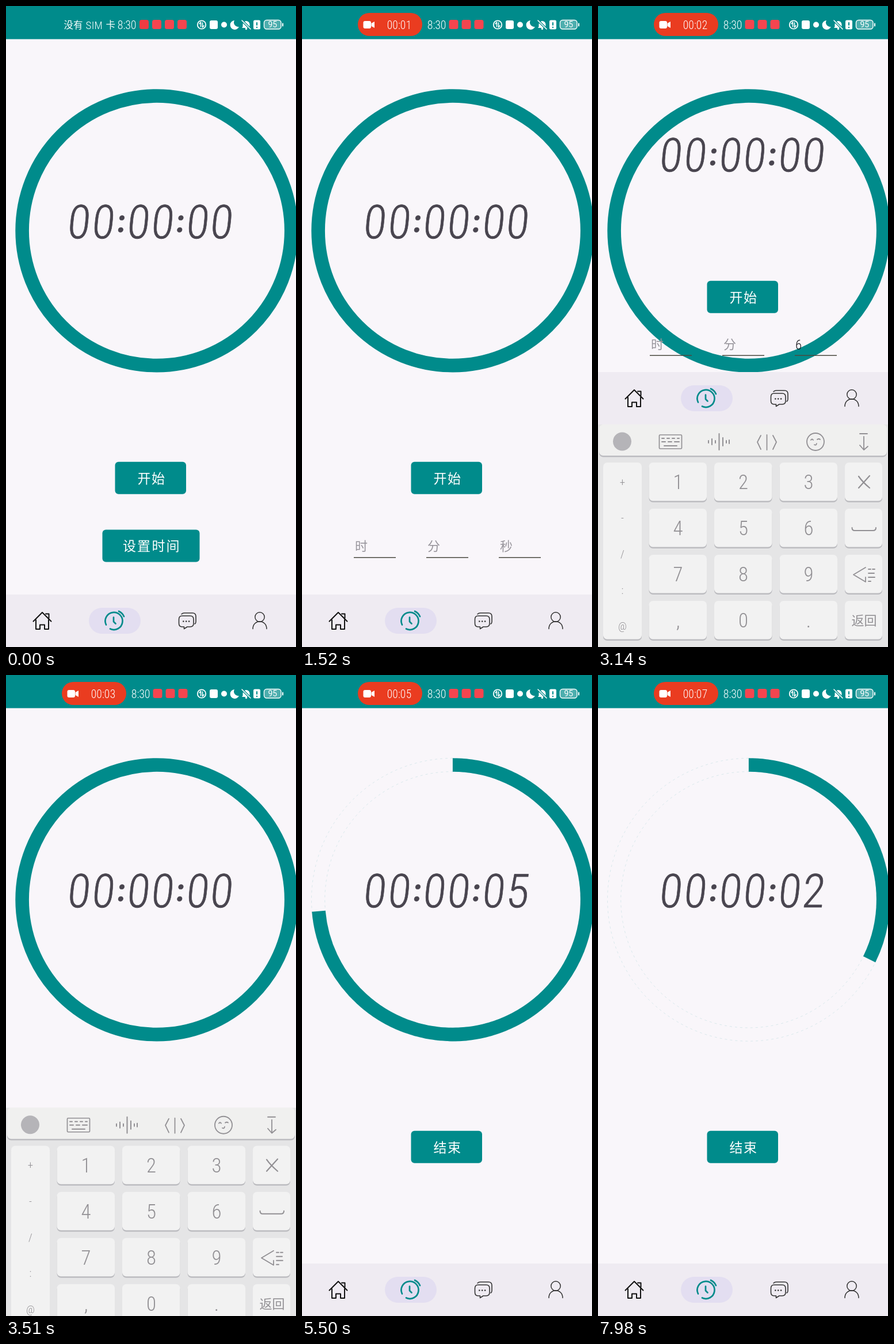
Recreate the animation shown at these times as an HTML page. Size 504 by 1112 pixels, loop 8 s.

```html
<!DOCTYPE html>
<html lang="zh">
<head>
<meta charset="utf-8">
<title>倒计时</title>
<style>
html, body { margin: 0; width: 100%; height: 100%; overflow: hidden; background: #f9f6fa; }
svg { display: block; width: 504px; height: 1112px; }
text { font-family: Roboto, "Noto Sans CJK SC", "Noto Sans CJK", sans-serif; font-weight: 300; }
.thin { font-family: "Roboto Condensed", "Open Sans Condensed", Roboto, sans-serif; font-stretch: 75%; }
.colon { font-size: 52px; font-weight: 700; }
.line { fill: none; stroke-linecap: round; stroke-linejoin: round; }
</style>
</head>
<body>
<svg id="stage" viewBox="0 0 504 1112"></svg>
<script>
const LOOP = 8000, TEAL = '#008b8b', GREY = '#929094', BG = '#f9f6fa', INK = '#49454f';
const CX = 261.9, CY = 389.8;
const T = {
  rec: 210, recEnd: 960, fields: 1400, show: 2112, key: 2950, typed: 3000,
  hide: 3430, press: 3840, run: 3919
};
const KEYBOARD_H = 386, COUNT = 6;

const rect = (x, y, w, h, r, fill, more = '') =>
  `<rect x="${x}" y="${y}" width="${w}" height="${h}" rx="${r}" fill="${fill}" ${more}/>`;
const circle = (x, y, r, fill, more = '') => `<circle cx="${x}" cy="${y}" r="${r}" fill="${fill}" ${more}/>`;
const line = (d, color, w, more = '') =>
  `<path class="line" d="${d}" stroke="${color}" stroke-width="${w}" ${more}/>`;
const text = (x, y, size, str, fill, more = '') =>
  `<text x="${x}" y="${y}" font-size="${size}" fill="${fill}" ${more}>${str}</text>`;
const mid = 'text-anchor="middle"';
const thin = 'class="thin"';
const group = (id, body) => `<g id="${id}">${body}</g>`;

function statusBar() {
  const apps = [232, 254, 276, 298].map((x, i) =>
    rect(x, 24, 16, 16, 3.5, i ? '#f5454f' : '#f03c42', i ? '' : 'id="firstApp"')).join('');
  const moon = '<path d="M397 25a8 8 0 1 0 8 11a7.5 7.5 0 0 1-8-11z" fill="#fff"/>';
  const bell = '<path d="M411.5 36v-4a6 6 0 0 1 12 0v4l1.5 2h-15z" fill="#fff"/>' +
    circle(417.5, 39.5, 1.7, '#fff') +
    line('M410 25L425 40', TEAL, 4) + line('M410 25L425 40', '#fff', 1.6);
  return rect(0, 0, 504, 57.5, 0, TEAL) +
    group('sim', text(100.5, 39, 16.5, '没有', '#fff') +
      text('143.5 151 160.5', 39.5, 19, 'SIM', '#fff', `${thin} ${mid}`) +
      text(173.5, 39, 16.5, '卡', '#fff')) +
    group('clockText', text('198.5 205.5 212 221.5', 39.5, 20, '8:30', '#fff', `${thin} ${mid}`)) +
    group('apps', apps) +
    circle(340, 32.5, 7.2, 'none', 'stroke="#fff" stroke-width="1.8"') +
    line('M336 31L338.5 28V36M341.5 29V37L344 34', '#fff', 1.6) +
    rect(354, 25, 14, 15, 3, '#fff') + circle(379, 32.5, 5, '#fff') +
    moon + bell +
    rect(430, 24.5, 12, 16, 2.5, '#fff') + rect(435, 28, 2, 6, 1, TEAL) + circle(436, 37, 1.2, TEAL) +
    rect(448.5, 24.5, 29.5, 15.5, 4.5, 'rgba(255,255,255,.3)', 'stroke="#fff" stroke-width="1.4"') +
    rect(480, 29.5, 2, 6, 1, '#fff') +
    text(463.3, 37, 14, '95', '#fff', `${mid} style="font-weight:400"`) +
    group('rec', rect(97, 12, 112, 40, 20, '#ea3c20') +
      rect(106.5, 26, 13.5, 13, 3, '#fff') +
      '<path d="M120.5 30L126 27V38L120.5 35z" fill="#fff"/>' +
      text('152.500 162 169 175.500 185.500', 39.5, 19.5, '', '#fff', `id="recText" ${thin} ${mid}`));
}

function navBar() {
  const home = line('M47.5 1067.5L63 1052L78.5 1067.5M52 1065V1081H59V1073.5H67V1081H74V1065M69 1054.5H74.5V1062', '#111', 2);
  const clock = line('M174 1073.500A15 15 0 1 1 181 1080.500M187 1060.500V1068L190.500 1071.500M196 1050Q202 1052.500 205 1059', TEAL, 2.7);
  const chat = line('M306 1058H320Q326 1058 326 1064V1071Q326 1077 320 1077H315L309.5 1080.5V1077H306Q300.5 1077 300.5 1071V1064Q300.5 1058 306 1058', '#333', 1.6) +
    line('M305 1055Q307 1053 310 1053H324Q330 1053 330 1059V1068Q330 1071 328 1072', '#333', 1.6) +
    [308.3, 313.2, 318.1].map(x => circle(x, 1067.5, 1.3, '#333')).join('');
  const person = circle(441, 1060, 8.2, 'none', 'stroke="#333" stroke-width="1.5"') +
    line('M429 1080.5C429 1063.5 453 1063.5 453 1080.5', '#333', 1.5);
  return rect(0, 1021, 504, 91, 0, '#efebf2') +
    rect(144, 1044, 90, 45, 22.5, '#e3def1') + home + clock + chat + person;
}

function keyboard() {
  const cap = (x, y, w, h, more = '') =>
    rect(x, y + 2.5, w, h, 7, '#bcbcc0') + rect(x, y, w, h, 7, '#f2f2f2', more);
  const cols = [88.5, 202, 315.5], rows = [792, 872, 952, 1032];
  const glyphs = ['123', '456', '789', ',0.'];
  let s = rect(0, 726, 504, 386, 0, '#e5e5e6') +
    rect(2, 732, 500, 50.5, 7, '#bcbcc0') + rect(2, 726, 500, 54, 7, '#f0f0ef') + cap(9, 792, 67, 306.5);
  rows.forEach((y, r) => {
    cols.forEach((x, c) => {
      const g = glyphs[r][c];
      s += cap(x, y, 100.5, 66.5, g === '6' ? 'id="six"' : '') +
        text(x + 50.5, y + 46, 35, g, GREY, `${thin} ${mid}`);
    });
    s += cap(429, y, 65, 66.5);
  });
  [...'+-/:@'].forEach((g, i) => { s += text(42.5, 831.5 + i * 62.7, 19, g, GREY, `${thin} ${mid}`); });
  s += line('M453 816Q460 826 472 836M472 815L453 836', GREY, 2.2);
  s += line('M441.5 905Q441.5 910 446 910H478Q483 910 483 905', GREY, 2);
  s += line('M465 974L444 986.5L465 999V991M470 977H474M477 977H481M470 984H480M470 991H481M470 998H474', GREY, 1.8);
  s += text(462.5, 1074, 22, '返回', GREY, mid);
  s += circle(42, 755.5, 16, '#b5b4b8');
  s += rect(106.5, 744, 39, 24, 1.5, 'none', `stroke="${GREY}" stroke-width="1.7"`) +
    line('M111 750H115M120 750H124M129 750H133M138 750H141M111 756H117M122 756H128M133 756H141M115 763H137', GREY, 2);
  s += line('M192 754V758M198 751V761M204 754V758M210.5 742V770M217 749V763M223 754V758M228 753V759', GREY, 2);
  s += line('M283 745L277 756.5L283 769M293.5 744V770M304 745L310 756.5L304 769', GREY, 1.8);
  s += circle(378, 756, 15, 'none', `stroke="${GREY}" stroke-width="1.8"`) +
    line('M370 753Q372 750 374 753M381 752Q384 750 386 752M376 761Q379 763 380 759', GREY, 1.8);
  s += line('M455 742H468M462 747V769M455 762L462 770L469 764', GREY, 1.8);
  return s;
}

function fields() {
  return ['时', '分', '秒'].map((h, i) => {
    const x = 90 + i * 126;
    return text(x + 2, 945, 22, h, '#98959c', i === 2 ? 'id="hint"' : '') +
      rect(x, 956, 73, 1.5, 0, '#4a4a40');
  }).join('') + text(343, 946.5, 23, '6', '#1b1b1f', `id="typed" ${thin}`);
}

function timer() {
  const colon = '<tspan class="colon">:</tspan>';
  return `<g transform="translate(0 375) skewX(-6) translate(0 -375)">` +
    text('127.5 170 200.5 231 273 303 334 375.5', '403.5 403.5 392.5 403.5 403.5 392.5 403.5 403.5', 81,
      `00${colon}00${colon}<tspan id="secs"></tspan>`, INK,
      `${thin} ${mid} stroke="${INK}" stroke-width=".7" stroke-linejoin="round"`) + '</g>';
}

const edge = r => circle(CX, CY, r, 'none', `stroke="${TEAL}" stroke-opacity=".22" stroke-width=".6" stroke-dasharray="4 5"`);
const button = (x, y, w, h, glow, label) =>
  rect(x, y, w, h, 6, TEAL) + label + rect(x, y, w, h, 6, '#fff', `id="${glow}"`);

document.getElementById('stage').innerHTML =
  rect(0, 0, 504, 1112, 0, BG) +
  group('edges', edge(245.4) + edge(222.2)) +
  circle(CX, CY, 233.8, 'none', `id="ring" stroke="${TEAL}" stroke-width="23.6" pathLength="360" transform="rotate(-90 ${CX} ${CY})"`) +
  group('timer', timer()) +
  group('start', button(189.5, 790.7, 123.5, 56, 'startGlow',
    text('240 264.5', 827.5, 23, '', '#fff', `id="startText" ${mid}`))) +
  group('setTime', button(167.5, 908.5, 169, 56, 'setGlow',
    text('214.5 239.5 265 290', 945, 23, '设置时间', '#fff', mid))) +
  group('fields', fields()) +
  group('nav', navBar()) +
  group('keys', keyboard()) +
  statusBar();

const el = {};
document.querySelectorAll('[id]').forEach(n => { el[n.id] = n; });
const clamp = v => Math.max(0, Math.min(1, v));
const part = (t, a, b) => clamp((t - a) / (b - a));
const easeOut = u => 1 - (1 - u) ** 3;
const show = (n, on) => n.setAttribute('visibility', on ? 'visible' : 'hidden');
const fade = (n, v) => n.setAttribute('opacity', v);
const move = (n, x, y) => n.setAttribute('transform', `translate(${x} ${y})`);
const write = (n, s) => { if (n.textContent !== s) n.textContent = s; };
const two = n => String(n).padStart(2, '0');
const backOut = u => 1 + 2.2 * (u - 1) ** 3 + 1.2 * (u - 1) ** 2;

function render(t) {
  // recording pill pushes the clock aside
  const slide = easeOut(part(t, T.rec, 610));
  fade(el.sim, 1 - part(t, T.rec, 360));
  move(el.clockText, 24 * slide, 0);
  move(el.apps, 1.5 * slide, 0);
  fade(el.firstApp, 1 - part(t, T.rec, 360));
  const grow = backOut(part(t, 300, T.recEnd));
  show(el.rec, t >= 300);
  el.rec.setAttribute('transform', `translate(153 32) scale(${Math.max(0, grow)}) translate(-153 -32)`);
  write(el.recText, '00:' + two(Math.max(0, Math.floor((t - 240) / 1000))));

  // form and raised layout
  const running = t >= T.run;
  const up = t >= T.show && t < T.hide ? 1 : 0;
  show(el.setTime, t < T.fields);
  fade(el.setGlow, t < 1190 ? 0 : 0.15);
  show(el.fields, t >= T.fields && !running);
  const typed = t >= T.typed;
  el.hint.style.display = typed ? 'none' : '';
  el.typed.style.display = typed ? '' : 'none';
  move(el.timer, 0, -116.5 * up);
  move(el.start, 0, -314 * up);
  move(el.fields, 0, -350.5 * up);
  move(el.nav, 0, -KEYBOARD_H * up);

  const raise = easeOut(part(t, T.show, T.show + 400));
  const drop = part(t, T.hide, 3750) ** 2;
  move(el.keys, 0, KEYBOARD_H * (1 - raise + drop));
  el.six.setAttribute('fill', t >= T.key && t < T.key + 110 ? '#dcdbe1' : '#f2f2f2');

  // countdown
  const past = Math.max(0, t - T.run);
  const left = Math.max(0, COUNT - past / 1000);
  write(el.startText, running ? '结束' : '开始');
  fade(el.startGlow, t >= T.press ? 0.15 * (1 - part(t, T.press, T.press + 350)) : 0);
  write(el.secs, two(running ? Math.ceil(left) : 0));
  show(el.edges, running);
  el.ring.setAttribute('stroke-dasharray', running ? `${left * 60} 360` : 'none');
}

const origin = performance.now();
function tick() {
  render(Math.max(0, performance.now() - origin) % LOOP);
  requestAnimationFrame(tick);
}
render(0);
requestAnimationFrame(tick);
</script>
</body>
</html>
```
